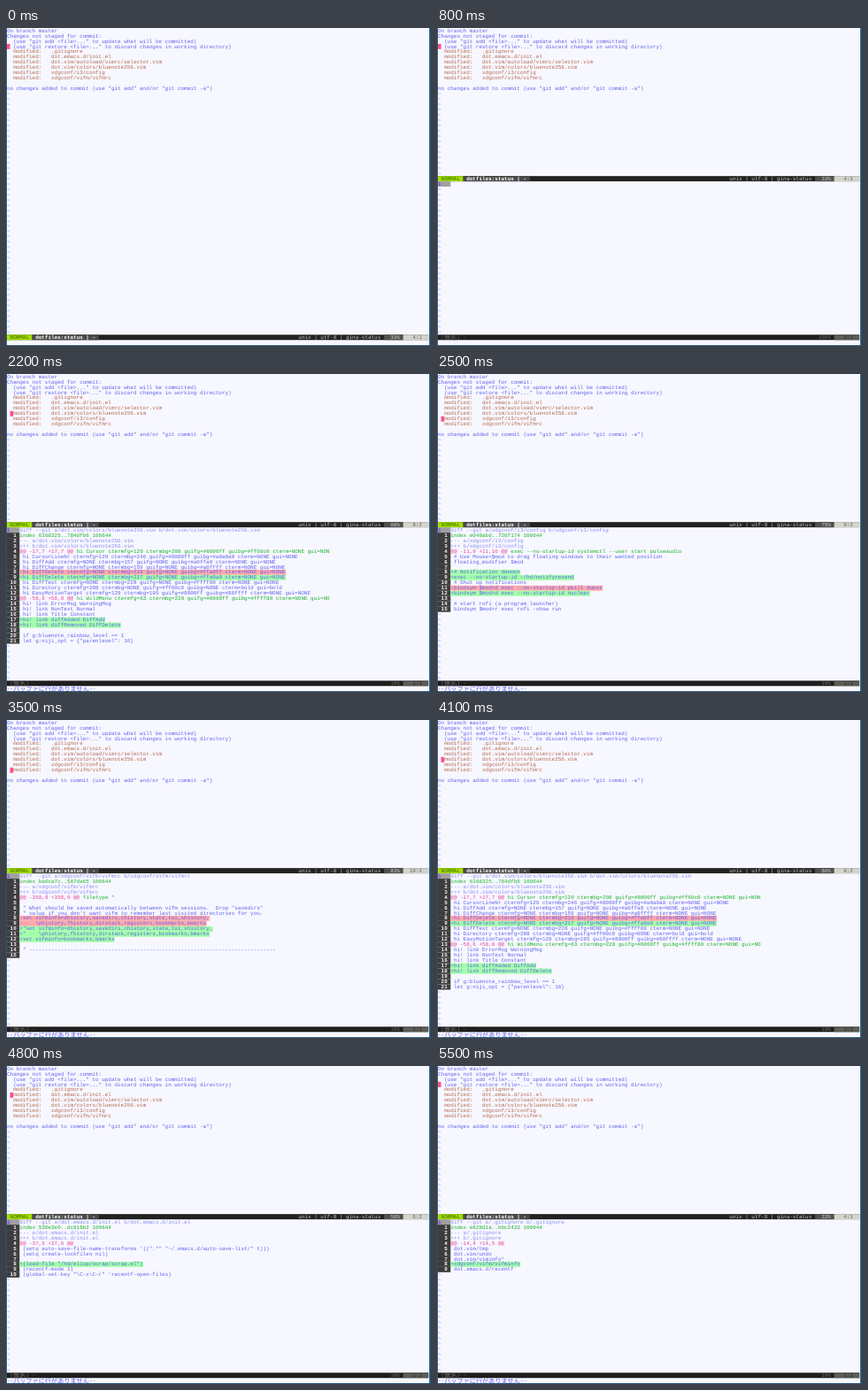
These frames come from a looping animation (480 by 359 pixels, 6700 ms). An HTML page:

```html
<!DOCTYPE html>
<html lang="en">
<head>
<meta charset="utf-8">
<title>Git status with diff preview</title>
<style>
html, body { margin: 0; width: 100%; height: 100%; overflow: hidden; background: #f7f7ff; }
svg { display: block; width: 100vw; height: 100vh; }
text {
  font: 5.967px "Liberation Mono", "DejaVu Sans Mono", monospace;
  white-space: pre;
  text-rendering: geometricPrecision;
}
text.bold { font-weight: bold; }
text.wide { font: 7.16px "Noto Sans CJK JP", "Noto Sans CJK", sans-serif; }
</style>
</head>
<body>
<svg id="stage" viewBox="0 0 480 359" preserveAspectRatio="none"></svg>
<script>
const LOOP = 6700, CW = 3.58, RH = 5.97, LEFT = 1, COLS = 133;
const INK = '#6262ee', PALE = '#8c8cf4', RED = '#b4684a', GREEN = '#18b428', PINK = '#e8449a';
const ADD = '#a0ffa8', DEL = '#ffa8ac', CURSOR = '#ff4f8c', PAPER = '#f7f7ff';

const diff = (path, hash, body) => [
  `diff --git a/${path} b/${path}`,
  `index ${hash} 100644`,
  `--- a/${path}`,
  `+++ b/${path}`,
  ...body.split('\n')
];

const paths = [
  '.gitignore',
  'dot.emacs.d/init.el',
  'dot.vim/autoload/vimrc/selector.vim',
  'dot.vim/colors/bluenote256.vim',
  'xdgconf/i3/config',
  'xdgconf/vifm/vifmrc'
];

const plain = 'cterm=NONE gui=NONE';
const diffs = [
  diff(paths[0], 'e828d1a..bbc2433',
`@@ -14,4 +14,5 @@
 dot.vim/tmp
 dot.vim/undo
 dot.vim/viminfo*
+xdgconf/vifm/vifminfo
 dot.emacs.d/recentf`),
  diff(paths[1], '530e3e0..dc816b2',
`@@ -37,5 +37,6 @@
 (setq auto-save-file-name-transforms '((".*" "~/.emacs.d/auto-save-list/" t)))
 (setq create-lockfiles nil)
 
+(load-file "/hd/elisp/scrap/scrap.el")
 (recentf-mode 1)
 (global-set-key "\\C-x\\C-r" 'recentf-open-files)`),
  diff(paths[2], '3f2b9c1..a47d0e6',
`@@ -21,7 +21,8 @@ function! vimrc#selector#open() abort
   let l:name = expand('<cword>')
   let l:list = s:collect(l:name)
 
-  call s:show(l:list)
+  call s:show(l:list, 0)
+  call s:mark(l:name)
   return len(l:list)
 endfunction
 `),
  diff(paths[3], '6168325..784dfb6',
`@@ -17,7 +17,7 @@ hi Cursor ctermfg=129 ctermbg=208 guifg=#8000ff guibg=#ff60c0 cterm=NONE gui=NON
 hi CursorLineNr ctermfg=129 ctermbg=246 guifg=#8000ff guibg=#a0a0a0 ${plain}
 hi DiffAdd ctermfg=NONE ctermbg=157 guifg=NONE guibg=#a0ffa0 ${plain}
 hi DiffChange ctermfg=NONE ctermbg=159 guifg=NONE guibg=#a0ffff ${plain}
-hi DiffDelete ctermfg=NONE ctermbg=219 guifg=NONE guibg=#ffa0ff ${plain}
+hi DiffDelete ctermfg=NONE ctermbg=217 guifg=NONE guibg=#ffa0a0 ${plain}
 hi DiffText ctermfg=NONE ctermbg=228 guifg=NONE guibg=#ffff60 ${plain}
 hi Directory ctermfg=208 ctermbg=NONE guifg=#ff60c0 guibg=NONE cterm=bold gui=bold
 hi EasyMotionTarget ctermfg=129 ctermbg=195 guifg=#8000ff guibg=#80ffff ${plain}
@@ -58,6 +58,8 @@ hi WildMenu ctermfg=63 ctermbg=228 guifg=#6060ff guibg=#ffff80 cterm=NONE gui=NO
 hi! link ErrorMsg WarningMsg
 hi! link NonText Normal
 hi! link Title Constant
+hi! link diffAdded DiffAdd
+hi! link diffRemoved DiffDelete
 
 if g:bluenote_rainbow_level == 1
 let g:niji_opt = {"parenlevel": 16}`),
  diff(paths[4], 'e049abd..726f174',
`@@ -11,9 +11,10 @@ exec --no-startup-id systemctl --user start pulseaudio
 # Use Mouse+$mod to drag floating windows to their wanted position
 floating_modifier $mod
 
+# Notification daemon
+exec --no-startup-id ~/hd/notifyresend
 # Shut up notifications
-bindsym $mod+d exec --no-startup-id pkill dunst
+bindsym $mod+d exec --no-startup-id nuclear
 
 # start rofi (a program launcher)
 bindsym $mod+r exec rofi -show run`),
  diff(paths[5], 'ba6ca7c..587da65',
`@@ -358,8 +358,9 @@ filetype *
 
 " What should be saved automatically between vifm sessions.  Drop "savedirs"
 " value if you don't want vifm to remember last visited directories for you.
-set vifminfo=dhistory,savedirs,chistory,state,tui,shistory,
-    \\phistory,fhistory,dirstack,registers,bookmarks,bmarks
+"set vifminfo=dhistory,savedirs,chistory,state,tui,shistory,
+"    \\phistory,fhistory,dirstack,registers,bookmarks,bmarks
+set vifminfo=bookmarks,bmarks
 
 " ${'-'.repeat(78)}
 `)
];

const status = [
  'On branch master',
  'Changes not staged for commit:',
  '  (use "git add <file>..." to update what will be committed)',
  '  (use "git restore <file>..." to discard changes in working directory)',
  ...paths.map(p => '  modified:   ' + p),
  '',
  'no changes added to commit (use "git add" and/or "git commit -a")'
];

// [time, cursor row], [time, previewed file]; -1 is an empty preview, -2 none
const moves = [[0, 3], [1200, 4], [1500, 5], [1800, 6], [2100, 7], [2500, 8], [2800, 9], [3100, 10],
  [3500, 9], [3800, 8], [4100, 7], [4400, 6], [4700, 5], [5100, 4], [5400, 3]];
const loads = [[0, -2], [700, -1], [1200, 0], [1500, 1], [1900, 2], [2200, 3], [2500, 4], [2800, 5],
  [3800, 4], [4100, 3], [4500, 2], [4800, 1], [5100, 0]];

const at = (steps, t) => steps.filter(s => s[0] <= t).pop()[1];
const within = (t, a, b) => t >= a && t < b;
const isFile = row => row > 3 && row < 10;
const escapeText = s => s.replace(/&/g, '&amp;').replace(/</g, '&lt;');

let out;

function box(col, row, cols, fill) {
  out += `<rect x="${LEFT + col * CW}" y="${row * RH}" width="${cols * CW}" height="${RH}" fill="${fill}"/>`;
}

// Full-width characters take two cells
function put(col, row, str, fill, cls = '') {
  for (const run of str.match(/[\u3000-\u9fff]+|[^\u3000-\u9fff]+/g) || []) {
    const wide = run.charCodeAt(0) >= 0x3000;
    if (run.trim()) {
      out += `<text x="${LEFT + col * CW}" y="${row * RH + (wide ? 5.4 : 4.6)}" fill="${fill}" class="${wide ? 'wide' : cls}">${escapeText(run)}</text>`;
    }
    col += run.length * (wide ? 2 : 1);
  }
}

function segment(col, row, str, fill, bg, cls) {
  box(col, row, str.length, bg);
  put(col, row, str, fill, cls);
}

function tildes(from, to) {
  for (let r = from; r < to; r++) put(0, r, '~', INK);
}

const place = (line, col) => '   '.slice(String(line).length) + ' ' + line + ':' + String(col).padEnd(2) + ' ';
const percent = n => ' ' + String(n).padStart(3) + '% ';

function activeBar(row, cur) {
  box(0, row, COLS, '#222222');
  segment(0, row, ' NORMAL ', '#2f7000', '#a8dc00');
  segment(8, row, ' dotfiles:status | - ', '#ffffff', '#484848', 'bold');
  put(92, row, 'unix | utf-8 | gina-status', '#c4c4bc');
  segment(119, row, percent(Math.floor((cur + 1) * 100 / status.length)), '#d0d0c4', '#505050');
  segment(125, row, place(cur + 1, isFile(cur) ? 2 : 1), '#606058', '#d4d4cc');
}

function idleBar(row, empty) {
  box(0, row, COLS, '#1e1e1e');
  put(1, row, '[無名] -', '#6a6a66');
  put(119, row, percent(empty ? 100 : 10), '#6a6a66');
  segment(125, row, place(empty ? 0 : 1, 1), '#262626', '#5c5c56');
}

function statusLines(cur, showCursor) {
  status.forEach((s, r) => put(0, r, s, isFile(r) ? RED : INK));
  if (showCursor) box(isFile(cur) ? 1 : 0, cur, 1, CURSOR);
}

function preview(file) {
  const lines = file < 0 ? [''] : diffs[file];
  lines.forEach((s, i) => {
    const row = 29 + i;
    box(0, row, 4, i ? '#3c3c3c' : '#a0a0a0');
    if (i) put(0, row, String(i).padStart(3), '#f4f4f4', 'bold');
    else put(0, row, '1', '#8000ff');
    const hunk = s.match(/^(@@.*?@@)(.*)/);
    if (hunk) {
      put(4, row, hunk[1], PINK);
      put(4 + hunk[1].length, row, hunk[2], GREEN);
      return;
    }
    if (i > 3 && /^[+-]/.test(s)) box(4, row, s.length, s[0] === '+' ? ADD : DEL);
    put(4, row, s, i === 1 ? GREEN : i < 4 ? PALE : INK);
  });
  tildes(29 + lines.length, 58);
}

function edges() {
  out += '<path d="M0 0h1v358h477V0h2v359H0z" fill="#285577"/>';
}

function draw(s) {
  out = `<rect width="480" height="359" fill="${PAPER}"/>`;
  const split = s.file > -2;
  statusLines(s.cur, s.cursor);
  tildes(status.length, split ? 28 : 58);
  activeBar(split ? 28 : 58, s.cur);
  if (split) {
    preview(s.file);
    idleBar(58, s.file < 0);
  }
  if (s.message) put(0, 59, '--バッファに行がありません--', INK);
  if (s.key) put(122, 59, 'p', INK);
  edges();
  document.getElementById('stage').innerHTML = out;
}

let last = '';
const start = performance.now();

function tick() {
  const t = (performance.now() - start) % LOOP;
  const state = {
    cur: at(moves, t),
    file: at(loads, t),
    cursor: !within(t, 100, 200) && !within(t, 700, 800),
    key: within(t, 500, 700),
    message: t >= 1500
  };
  const id = JSON.stringify(state);
  if (id !== last) {
    last = id;
    draw(state);
  }
  requestAnimationFrame(tick);
}
tick();
</script>
</body>
</html>
```
